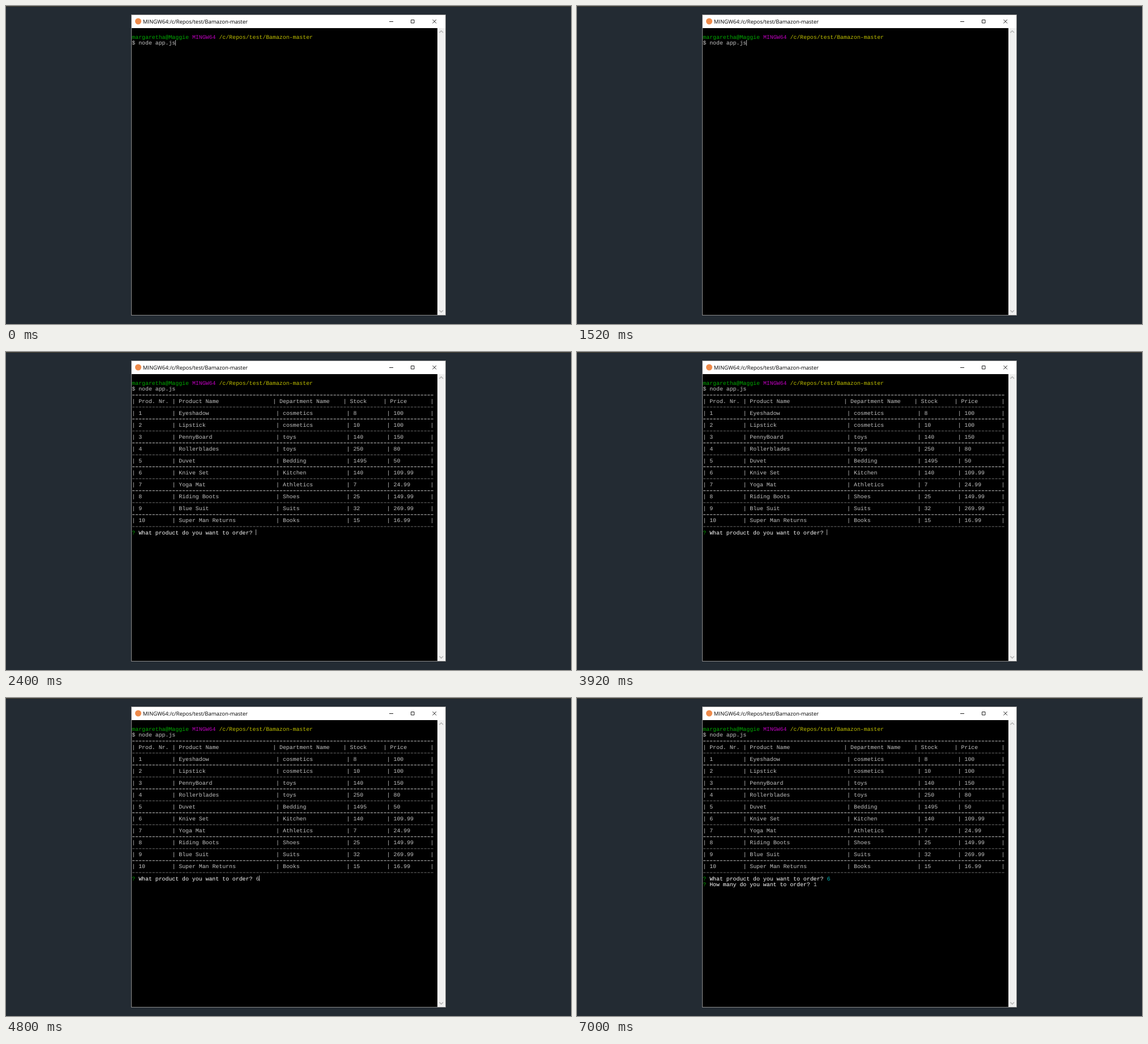
Recreate the animation shown at these times as an HTML page. Size 998 px wide and 561 px high, loop 8 s.

```html
<!DOCTYPE html>
<html lang="en">
<head>
<meta charset="utf-8">
<title>Terminal shop</title>
<style>
html, body { margin: 0; width: 100%; height: 100%; overflow: hidden; background: #232b33; }
svg { display: block; width: 998px; height: 561px; }
text { font-family: "Liberation Mono", monospace; font-size: 9.877px; fill: #c4c4c4; text-rendering: geometricPrecision; }
.title { font-family: "Open Sans", "Noto Sans", sans-serif; font-size: 9.47px; fill: #000; }
.green { fill: #00a800; }
.pink { fill: #bf00bf; }
.gold { fill: #bfbf00; }
.white { fill: #fff; }
.cyan { fill: #00b4b4; }
.thin { fill: none; stroke: #222; stroke-width: 1; }
.arrow { fill: none; stroke: #b4b4b4; stroke-width: 1.5; }
.rule { stroke: #c4c4c4; stroke-width: 1; stroke-dasharray: 4.3 1.626; }
.faint { opacity: .55; }

#list, #typed, #answer { animation: 8s step-end infinite; }
#list { animation-name: list; }
#typed { animation-name: typed; }
#answer { animation-name: answer; }
#caret { animation: caret 8s step-end infinite; }
@keyframes list { 0% { opacity: 0; } 30%, 100% { opacity: 1; } }
@keyframes typed { 0% { opacity: 0; } 60% { opacity: 1; } 87.5%, 100% { opacity: 0; } }
@keyframes answer { 0% { opacity: 0; } 87.5%, 100% { opacity: 1; } }
@keyframes caret {
  0% { transform: translate(299px, 60px); opacity: 1; }
  30% { transform: translate(441px, 313px); opacity: 1; }
  60% { transform: translate(447px, 313px); opacity: 1; }
  87.5%, 100% { transform: translate(447px, 313px); opacity: 0; }
}
</style>
</head>
<body>
<svg viewBox="0 0 998 561">
  <rect width="998" height="561" fill="#232b33"/>
  <rect width="998" height="1" fill="#4f4838"/>
  <rect x="221" y="15" width="556" height="531" fill="#8c8c8c"/>
  <rect x="222" y="16" width="554" height="23" fill="#fff"/>
  <rect x="222" y="39" width="540" height="506" fill="#000"/>
  <rect x="762" y="39" width="14" height="506" fill="#f0f0f0"/>
  <circle cx="233.5" cy="27" r="5.5" fill="#ee8a4a"/>
  <text class="title" x="241.8" y="30.9">MINGW64:/c/Repos/test/Bamazon-master</text>
  <path class="thin" d="M677 27.5h7M715.5 24.5h5.5v5.5h-5.5zM753.5 24l6.5 6.5M760 24l-6.5 6.5"/>
  <path class="arrow" d="M765.5 47l3.3-3.3 3.3 3.3M765.5 536.8l3.3 3.3 3.3-3.3"/>
  <g id="prompt"></g>
  <g id="list"></g>
  <g id="typed"></g>
  <g id="answer"></g>
  <rect id="caret" width="1" height="10" fill="#a8a8a8"/>
</svg>
<script>
const LEFT = 222.3, TOP = 57.9, CHAR = 5.926, LINE = 10.545;
const headCols = [2, 14, 44, 65, 77];
const rowCols = [2, 14, 45, 66, 78];
const table = [
  "Prod. Nr.,Product Name,Department Name,Stock,Price",
  "1,Eyeshadow,cosmetics,8,100",
  "2,Lipstick,cosmetics,10,100",
  "3,PennyBoard,toys,140,150",
  "4,Rollerblades,toys,250,80",
  "5,Duvet,Bedding,1495,50",
  "6,Knive Set,Kitchen,140,109.99",
  "7,Yoga Mat,Athletics,7,24.99",
  "8,Riding Boots,Shoes,25,149.99",
  "9,Blue Suit,Suits,32,269.99",
  "10,Super Man Returns,Books,15,16.99"
];

function add(id, tag, attrs, content = "") {
  const el = document.createElementNS("http://www.w3.org/2000/svg", tag);
  for (const key in attrs) el.setAttribute(key, attrs[key]);
  el.textContent = content;
  document.getElementById(id).append(el);
}

function write(id, col, row, content, color = "") {
  add(id, "text", { x: LEFT + col * CHAR, y: TOP + row * LINE, class: color }, content);
}

function rule(i) {
  const y = 76 + i * 2 * LINE;
  add("list", "line", { x1: 223, x2: 755.5, y1: y, y2: y, class: i % 2 ? "rule faint" : "rule" });
}

write("prompt", 0, 0, "margaretha@Maggie", "green");
write("prompt", 18, 0, "MINGW64", "pink");
write("prompt", 26, 0, "/c/Repos/test/Bamazon-master", "gold");
write("prompt", 0, 1, "$ node app.js");

table.forEach((line, i) => {
  const row = 3 + i * 2;
  const cols = i ? rowCols : headCols;
  rule(i);
  line.split(",").forEach((cell, c) => {
    write("list", cols[c] - 2, row, "|");
    write("list", cols[c], row, cell);
  });
  write("list", 89, row, "|");
});
rule(table.length);

write("list", 0, 25, "?", "green");
write("list", 2, 25, "What product do you want to order?", "white");
write("typed", 37, 25, "6");
write("answer", 37, 25, "6", "cyan");
write("answer", 0, 26, "?", "green");
write("answer", 2, 26, "How many do you want to order?", "white");
write("answer", 33, 26, "1");
</script>
</body>
</html>
```
